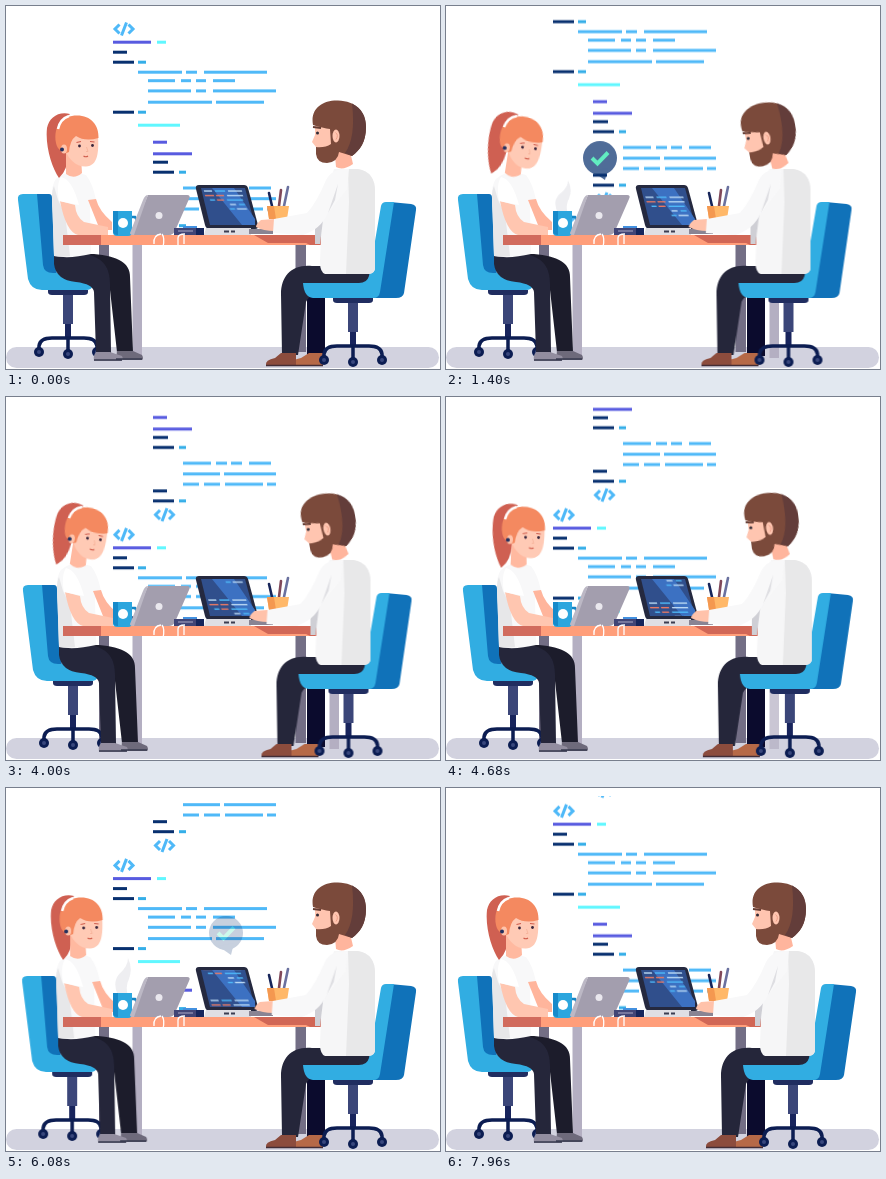
These frames come from a looping animation (434 px wide and 363 px high, 8 s). An HTML page:

```html
<!DOCTYPE html>
<html lang="en">
<head>
<meta charset="utf-8">
<title>Two developers at a desk</title>
<style>
html, body { margin: 0; width: 100%; height: 100%; overflow: hidden; background: #fff; }
svg { display: block; width: 434px; height: 363px; }
.loop { animation: 8s ease-in-out infinite; }
#scroll { animation-name: scroll; animation-timing-function: linear; }
#lines { animation-name: lines; animation-timing-function: linear; }
.roll { animation-name: roll; }
.nod { animation-name: nod; transform-origin: 67px 160px; }
.tail { animation-name: tail; transform-origin: 60px 112px; }
.lean { animation-name: lean; }
.bow { animation-name: bow; transform-origin: 340px 157px; }
.reach { animation-name: reach; }
.shown { animation-name: shown; }
.type { animation: type .4s ease-in-out infinite alternate; }
.steam { animation: steam 4s ease-in-out infinite; transform-origin: 116px 207px; }
.b1 { animation-name: b1; }
.b2 { animation-name: b2; }
.b3 { animation-name: b3; }
@keyframes scroll { 99.5%, 100% { transform: translateY(-230.4px); } }
@keyframes lines { 99.5%, 100% { transform: translateY(36px); } }
@keyframes roll { 0%, 21% { transform: none; } 32%, 72% { transform: translateX(5px); } 86%, 100% { transform: none; } }
@keyframes nod { 0%, 3% { transform: rotate(0); } 15%, 52% { transform: rotate(9deg); } 63%, 100% { transform: rotate(0); } }
@keyframes tail { 0%, 3% { transform: rotate(0); } 15%, 52% { transform: rotate(6deg); } 63%, 100% { transform: rotate(0); } }
@keyframes lean { 0%, 10.7% { transform: none; } 17.5%, 54% { transform: translateX(-4.5px); } 66%, 100% { transform: none; } }
@keyframes bow { 0%, 10.7% { transform: rotate(0); } 17.5%, 54% { transform: rotate(-10deg); } 66%, 100% { transform: rotate(0); } }
@keyframes reach { 0%, 10.7% { transform: none; } 17.5%, 54% { transform: translateX(-2px); } 66%, 100% { transform: none; } }
@keyframes shown { 0%, 10.7% { opacity: 0; } 17.5%, 54% { opacity: 1; } 66%, 100% { opacity: 0; } }
@keyframes type { from { transform: none; } to { transform: translateX(-1.5px); } }
@keyframes steam {
  0%, 18% { opacity: 0; transform: scaleY(.8); }
  31%, 72% { opacity: .95; }
  86%, 100% { opacity: 0; transform: scaleY(1.1); }
}
@keyframes b1 { 0%, 15.5% { opacity: 0; transform: translateY(28px); } 18.7%, 27% { opacity: 1; transform: none; } 29.5%, 100% { opacity: 0; transform: none; } }
@keyframes b2 { 0%, 28% { opacity: 0; transform: translateY(28px); } 31.5%, 42% { opacity: 1; transform: none; } 45%, 100% { opacity: 0; transform: none; } }
@keyframes b3 { 0%, 61% { opacity: 0; transform: translateY(28px); } 65%, 74% { opacity: 1; transform: none; } 77%, 100% { opacity: 0; transform: none; } }
</style>
</head>
<body>
<svg viewBox="0 0 434 363">
  <defs>
    <clipPath id="page"><rect y="8" width="434" height="221"/></clipPath>
    <clipPath id="glass"><path d="M195 182H239L249 219H204Z"/></clipPath>
    <g id="tag" fill="none" stroke="#4fb9f8" stroke-width="3">
      <path d="M-4.500-4.500L-9 0L-4.500 4.500M4.500-4.500L9 0L4.500 4.500M2.500-6.500L-2.500 6.500"/>
    </g>
    <g id="rows"></g>
    <g id="text"></g>
    <path id="check" d="M-8 0L-2.500 5.500L8-5.500" fill="none" stroke="#22e6a8" stroke-width="4"/>
    <g id="bubble" fill="#08306f"><circle r="17"/><path d="M-8 13L5 22L8 10Z"/></g>
    <g id="stand">
      <path d="M-20 0H20V2Q20 5 16 5H-16Q-20 5-20 2Z" fill="#202d60"/>
      <path d="M-5 5H5V34H-5Z" fill="#3b4679"/>
      <path d="M-3 34H3V49H-3Z" fill="#18245c"/>
      <path d="M-29 59V56Q-28 48 -16 48H16Q28 48 29 56V59M0 47V62" fill="none" stroke="#0c1d52" stroke-width="3.500"/>
      <g fill="#0c1d52"><circle cx="-29" cy="62" r="5"/><circle cx="0" cy="64" r="5"/><circle cx="29" cy="62" r="5"/></g>
      <g fill="#39477d"><circle cx="-29" cy="62" r="2"/><circle cx="0" cy="64" r="2"/><circle cx="29" cy="62" r="2"/></g>
    </g>
  </defs>

  <rect y="341" width="433" height="21" rx="10.500" fill="#d2d2df"/>

  <g clip-path="url(#page)">
    <g id="scroll" class="loop"><use href="#rows"/><use href="#rows" y="230.400"/></g>
  </g>

  <!-- table legs -->
  <path d="M93 238H103V346H93ZM289.500 238H300V346H289.500Z" fill="#736e85"/>
  <path d="M126.500 238H136V352H126.500Z" fill="#b4afc2"/>
  <path class="loop shown" d="M323.500 238H333V352H323.500Z" fill="#b4afc2"/>

  <!-- woman: chair and body -->
  <g class="loop roll">
    <use href="#stand" x="62" y="284"/>
    <path d="M28 188H43Q46 188 46 192L51 270H34Z" fill="#1072b9"/>
    <path d="M12 194Q11 188 17 188H31L37 259Q38 267 47 267H86Q91 284 80 284H36Q25 284 22 273Z" fill="#31ade2"/>
    <path d="M55 248H88C112 250 124 257 124 271L127 346H111L104 284L66 273Z" fill="#1c1c2b"/>
    <path d="M48 248H80C98 252 104 262 104 278L105 347H90L88 286Q87 278 70 276Q50 274 48 258Z" fill="#25263a"/>
    <path d="M111 345H127L136 349Q138 353 136 354H110Z" fill="#6e6a7b"/>
    <path d="M90 346H104L116 350Q118 354 115 355H88Q87 349 90 346Z" fill="#928d9f"/>
    <path d="M88 354H116M110 353H136" stroke="#393b50" stroke-width="1.500"/>
    <path d="M54 170Q64 164 80 169Q87 178 90 194L84 202L85 248Q64 253 48 250L46 187Q46 174 54 170Z" fill="#f8f8f9"/>
    <path d="M48 180Q46 184 46 191L48 250Q57 251 64 250L59 208L52 194Z" fill="#e7e7e9"/>
    <g class="loop nod">
      <path class="loop tail" d="M64 108C52 105 43 112 41 122C39 140 46 162 53 172Q62 164 62 147Q61 133 55 126Q55 116 64 108Z" fill="#cf6052"/>
      <path d="M60 143L75 150L76 167Q68 174 60 168Z" fill="#ffb9a0"/>
      <path d="M60 129H92C93 146 92 160 80 160.500C70 161 63 153 60 146Z" fill="#ffcab5"/>
      <path d="M50 137C47 119 57 109.500 71 109.500C85 109.500 93 119 92.500 132Q79 136 70 130Q64 134 63 146Q58 149 54 144Q51 142 50 137Z" fill="#f48960"/>
      <path d="M52 123Q54 113 63 110" fill="none" stroke="#fff" stroke-width="2.500"/>
      <ellipse cx="58" cy="143" rx="3" ry="4.500" fill="#ffc3aa"/>
      <circle cx="56" cy="143.500" r="2" fill="#23305f"/>
      <g fill="#39263c"><circle cx="73.500" cy="140" r="1.400"/><circle cx="86.500" cy="139.500" r="1.400"/></g>
      <path d="M70.500 136.500L75 135.500M84 135.500L88.500 136M77.500 150Q80 151.500 82 150" fill="none" stroke="#cf5c4c" stroke-width="1.200"/>
      <path d="M80.500 141L82 145.500H80" fill="none" stroke="#f5b199" stroke-width=".8"/>
    </g>
  </g>

  <!-- table top -->
  <path d="M57 229H95V239H57Z" fill="#d16b5d"/>
  <path d="M95 229H304V239H95Z" fill="#ff9e7a"/>
  <path d="M248 229H316V239H304L300 237H262Z" fill="#d16756"/>

  <g class="loop roll">
    <path d="M82 194L90 193Q93 205 106 216V224H94Z" fill="#ffb59c"/>
    <path d="M54 195L69 199Q70 211 78 216L102 221V229H72Q60 226 54 195Z" fill="#ffc6b0"/>
    <path d="M55 171Q66 173 73 199L53 195Q50 179 55 171Z" fill="#fff"/>
  </g>

  <!-- mug -->
  <path class="steam" d="M112 207Q106 194 113 185Q122 177 122 168Q127 179 123 190Q119 198 122 207Z" fill="#eeeef1"/>
  <path d="M126 211H129Q133 215 129 221Q127 224 124 224" fill="none" stroke="#1585c5" stroke-width="2.500"/>
  <path d="M107 205H126V226Q126 230 122 230H111Q107 230 107 226Z" fill="#2ca6de"/>
  <path d="M107 205H112V229Q107 229 107 225Z" fill="#178aca"/>
  <circle cx="117" cy="217" r="5" fill="#fff"/>

  <!-- left laptop, books, cables -->
  <path d="M142 189H181Q185 189 183 193L169 225Q167 229 163 229H125Z" fill="#a39eae"/>
  <path d="M142 189Q139 189 137 194L124 227Q124 229 128 229Z" fill="#bcb8c5"/>
  <circle cx="153" cy="209.500" r="3.500" fill="#eae8ee"/>
  <path d="M177 220H191V223H177Z" fill="#4390df"/>
  <path d="M168 222H190V229H168Z" fill="#414576"/>
  <path d="M190 222H198V229H190Z" fill="#15255b"/>
  <path d="M172 225H187" stroke="#aaa8c5"/>
  <path d="M155 228Q147 229 148 238M156 228Q159 232 157 241M172 239V232Q172 228 179 228M178 238V229" fill="none" stroke="#fff" stroke-width="1.300"/>

  <!-- right laptop -->
  <path d="M193 179H238Q241 179 242 182L252 219Q253 223 249 223H204Q200 223 199 219L190 183Q189 179 193 179Z" fill="#25293f"/>
  <path d="M195 182H239L249 219H204Z" fill="#304f8c"/>
  <path d="M206 182H228L249 213V219H236Z" fill="#3c71c2"/>
  <g clip-path="url(#glass)">
    <g transform="translate(0 185) skewX(13.500)">
      <g id="lines" class="loop"><use href="#text"/><use href="#text" y="-36"/></g>
    </g>
  </g>
  <path d="M200 222H245V229H198Z" fill="#dfdfe4"/>
  <path d="M243 223H267V228H243Z" fill="#898493"/>
  <path d="M218 225.500H223M225 225.500H229" stroke="#3a3d50" stroke-width="2"/>

  <!-- pencils -->
  <g fill="none" stroke-width="2.600" stroke-linecap="round">
    <path d="M263 187L266 200" stroke="#172559"/>
    <path d="M275 184L273 200" stroke="#804859"/>
    <path d="M282 181L278 200" stroke="#6a719f"/>
  </g>
  <path d="M261 200H283L281 213H263Z" fill="#ffb869"/>
  <path d="M261 200H268L270 213H263Z" fill="#f49850"/>

  <!-- man -->
  <path d="M301 282H319V350H301Z" fill="#0b0b2d"/>
  <g class="loop lean">
    <path d="M366 280V260H306C286 258 275 270 275 288L276 349H292L300 296Q303 287 325 287Z" fill="#25263a"/>
    <path d="M303 347H317V359H285Q284 354 295 352Z" fill="#b66947"/>
    <path d="M275 347H290V359H260Q259 354 269 352Z" fill="#8c4c3d"/>
    <path d="M260 359.500H290M285 359.500H317" stroke="#432d36" stroke-width="1.500"/>
    <use href="#stand" x="347" y="292"/>
    <path d="M384 196L405 198Q411 199 410 204L398 287Q397 292 390 292H360Z" fill="#1072b9"/>
    <path d="M375 200Q376 196 380 196H388L374 286Q373 292 367 292H307Q298 291 297 277H353Q361 277 363 270Z" fill="#31ade2"/>
    <path d="M328 163H352Q369 166 369 185V262Q369 267 363 268H319Q314 266 314 256L316 205Z" fill="#f6f6f7"/>
    <path d="M342 163H352Q369 166 369 185V262Q369 267 363 268H340L343 196Z" fill="#e8e8e9"/>
    <path d="M309 214L319 198L314 238H309Z" fill="#cfcfd5"/>
    <g class="loop bow">
      <path d="M328 137H342L347 158Q337 165 330 161Z" fill="#ffb59d"/>
      <path d="M309 117H331V149H314L310 141L306 136L309 129Z" fill="#ffc5b0"/>
      <path d="M307 119C304 103 316 94 332 94.500C350 95 360 106 360 121C360 136 354 144 346 150L333 146Q332 156 321 157Q311 157 310 148V141Q319 142 325 138L324 123Q317 122 307 119Z" fill="#7b4a3b"/>
      <path d="M346 97.500C356 102 360 111 360 121C360 136 354 144 346 150L339 147Q350 132 346 97.500Z" fill="#633d3a"/>
      <ellipse cx="330" cy="130" rx="3.500" ry="6.500" fill="#ffc5b0"/>
      <path d="M329.500 126.500Q333 129 330 133.500" fill="none" stroke="#ed9f88"/>
      <circle cx="311.500" cy="127" r="1.500" fill="#302b36"/>
      <path d="M307 121L315 122" stroke="#653d34" stroke-width="2"/>
    </g>
    <g class="loop reach"><g class="type">
      <path d="M268 213L255 214Q250 218 250 221Q257 225 269 225Z" fill="#ffc2aa"/>
      <path d="M343 163Q326 162 320 174Q311 196 301 207L268 213L267 227L297 229Q315 223 322 207L341 183Z" fill="#f8f8f9"/>
      <path d="M322 207L332 178L329 194Z" fill="#dedee2"/>
    </g></g>
  </g>

  <!-- speech bubbles -->
  <g transform="translate(154 144)"><g class="loop b1"><use href="#bubble"/><use href="#check"/></g></g>
  <g transform="translate(242 144)"><g class="loop b2">
    <use href="#bubble" transform="scale(-1 1)"/>
    <path d="M-5.500-5.500L5.500 5.500M5.500-5.500L-5.500 5.500" stroke="#f26b3d" stroke-width="4"/>
  </g></g>
  <g transform="translate(220 145)"><g class="loop b3"><use href="#bubble"/><use href="#check"/></g></g>
</svg>
<script>
const NS = 'http://www.w3.org/2000/svg';
const colors = { b: '#4fb9f8', p: '#585be0', n: '#08306f', c: '#60f7ff', s: '#35aee8', r: '#e77964', w: '#b9d8f4' };

function add(parent, name, attrs) {
  const node = document.createElementNS(NS, name);
  for (const key in attrs) node.setAttribute(key, attrs[key]);
  document.getElementById(parent).append(node);
}

// Each row: centre height, then colour key with start-end pairs.
function drawRows(parent, spec, height, slant = 0) {
  for (const row of spec.trim().split('\n')) {
    const [y, ...bars] = row.trim().split(' ');
    for (const bar of bars) {
      const [x1, x2] = bar.slice(1).split('-').map(Number);
      add(parent, 'rect', { x: x1 - slant * y, y: y - height / 2, width: x2 - x1, height, fill: colors[bar[0]] });
    }
  }
}

drawRows('rows', `
  36.2 p107-145 c151-160
  46.2 n107-121
  56.2 n107-128 s132-140
  66.2 b132-176 b180-191 b198-261
  74.7 b142-169 b175-185 b190-200 b207-229
  84.9 b142-185 b190-200 b207-270
  96.2 b142-206 b210-258
  106.2 n107-128 s132-140
  119.2 c132-174
  136.2 p147-161
  147.8 p147-186
  156.2 n147-162
  166.2 n147-168 s173-180
  182 b177-205 b210-221 b225-236 b243-265
  192.7 b177-214 b218-270
  203 b177-193 b198-214 b219-257 b261-270
  209.7 n147-161
  219.7 n147-168 s173-180`, 3);

for (const [x, y] of [[118, 23], [158.500, 233.500]]) {
  add('rows', 'use', { href: '#tag', x, y });
}

drawRows('text', `
  0 w198-206 b209-219 w222-236
  4.5 r199-208 r210-218 w221-237
  9 b204-209 r211-218 b221-237
  13.5 w224-230 b233-239
  18 b224-229 w231-241`, 1.4, 0.24);
</script>
</body>
</html>
```
